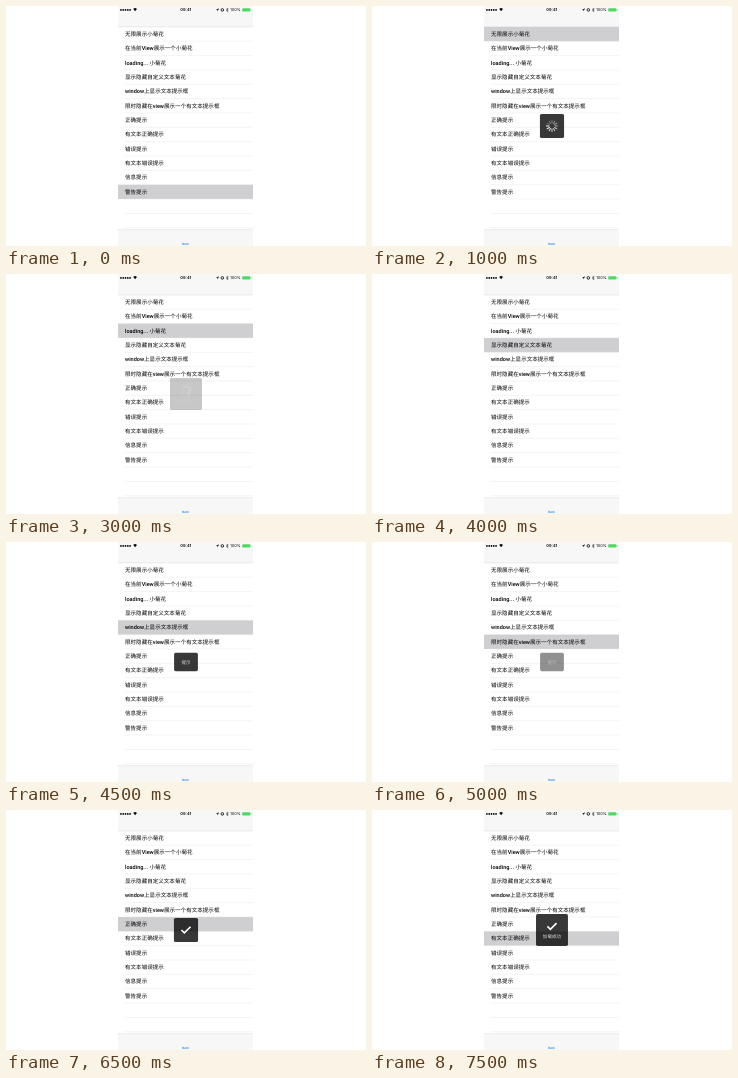
Animation of 360x240 px, one loop 8000 ms. Source, as an HTML page:

```html
<!DOCTYPE html>
<html lang="zh-CN">
<head>
<meta charset="utf-8">
<title>HUD list</title>
<style>
html, body { margin: 0; width: 100%; height: 100%; overflow: hidden; background: #fff; }
svg { display: block; width: 360px; height: 240px; }
text { font-family: Roboto, "Noto Sans CJK SC", "Noto Sans CJK", sans-serif; text-rendering: geometricPrecision; }
#status text { font-family: Inter, sans-serif; }
#list text { font-size: 17px; font-weight: 500; }
</style>
</head>
<body>
<svg viewBox="0 0 360 240">
  <!-- the phone screen, in 414 x 736 points -->
  <g transform="translate(112 0) scale(.32609)">
    <rect width="414" height="736" fill="#fff"/>
    <rect width="414" height="64" fill="#f8f7f8"/>
    <path d="M0 64H414" stroke="#d8d7d8" stroke-width="1.5"/>
    <g id="status" transform="translate(0 1)">
      <g id="dots"></g>
      <path d="M47 8q5.500-5 11 0l-5.500 7z"/>
      <text x="208" y="15" font-size="12.5" font-weight="600" text-anchor="middle">09:41</text>
      <g transform="translate(4 0)">
        <path d="M296 11l10-5-5 10v-5z"/>
        <circle cx="316" cy="11" r="4" fill="none" stroke="#000" stroke-width="2.500"/>
        <path d="M328 8l6 6-3 3V5l3 3-6 6" fill="none" stroke="#000" stroke-width="1.200"/>
        <text x="340" y="15" font-size="12">100%</text>
        <rect x="377" y="6" width="25" height="10" rx="2" fill="#4cd964"/>
        <rect x="403" y="9" width="2.500" height="4" rx="1" fill="#4cd964"/>
      </g>
    </g>
    <rect id="mark" width="414" height="44" fill="#cfced0"/>
    <g id="list"></g>
    <rect y="687" width="414" height="49" fill="#f8f7f8"/>
    <path d="M0 686H414" stroke="#d8d7d8" stroke-width="1.5"/>
    <text x="207" y="733" font-size="10" font-weight="500" text-anchor="middle" fill="#147aef">Item</text>
    <rect id="panel" rx="5" fill="#000"/>
    <g id="spinner"></g>
    <path id="check" d="M-14 0L-5 9L14-10" fill="none" stroke="#fff" stroke-width="5"/>
    <text id="label" font-size="14" text-anchor="middle" fill="#ddd"></text>
  </g>
</svg>
<script>
const $ = id => document.getElementById(id);
const STEP = 500, ROW = 44, TOP = 64, CX = 208.5, CY = 368;

function set(el, attrs) {
  for (const key in attrs) el.setAttribute(key, attrs[key]);
}

function add(parent, tag, attrs, text = '') {
  const el = document.createElementNS('http://www.w3.org/2000/svg', tag);
  set(el, attrs);
  el.textContent = text;
  return parent.appendChild(el);
}

const titles = [
  '无限展示小菊花', '在当前View展示一个小菊花', 'loading... 小菊花',
  '显示隐藏自定义文本菊花', 'window上显示文本提示框',
  '限时隐藏在view展示一个有文本提示框', '正确提示', '有文本正确提示',
  '错误提示', '有文本错误提示', '信息提示', '警告提示'
];

for (let i = 0; i < 5; i++) add($('dots'), 'circle', { cx: 9 + i * 7, cy: 11, r: 2.7 });
for (let i = 0; i < 14; i++) {
  const y = TOP + i * ROW;
  add($('list'), 'path', { d: `M20 ${y + ROW}H414`, stroke: '#e3e2e4', 'stroke-width': 1.2 });
  if (titles[i]) add($('list'), 'text', { x: 21.5, y: y + 28 }, titles[i]);
}
for (let i = 0; i < 12; i++) {
  add($('spinner'), 'path', {
    d: 'M0-9V-17', stroke: '#fff', 'stroke-width': 3, 'stroke-linecap': 'round',
    opacity: .25 + .75 * i / 11, transform: `rotate(${i * 30})`
  });
}

const huds = {
  spin: { w: 74, h: 74, icon: 'spinner' },
  loading: { w: 98, h: 98, icon: 'spinner', text: 'loading...' },
  custom: { w: 98, h: 98, icon: 'spinner', text: '加载中...' },
  tip: { w: 73, h: 56, text: '提示' },
  done: { w: 74, h: 74, icon: 'check' },
  success: { w: 98, h: 98, icon: 'check', text: '加载成功' }
};

// selected row, HUD, HUD opacity; one entry per half second
const steps = [
  [11, 'spin', 0], [0, 'spin', .6], [0, 'spin', 1],
  [1, 'spin', 1], [1, 'spin', .05],
  [2, 'loading', 1], [2, 'loading', .28],
  [3, 'custom', 1], [3, 'custom', 0],
  [4, 'tip', 1], [5, 'tip', .56], [5, 'tip', 1],
  [6, 'done', .62], [6, 'done', 1],
  [7, 'success', .6], [7, 'success', 1]
];

// panel and content fade separately, so content stays dim over a faint panel
function show(n) {
  const [row, name, opacity] = steps[n];
  const { w, h, icon, text = '' } = huds[name];
  const place = `translate(${CX} ${CY - (text ? 11 : 0)})`;
  set($('mark'), { y: TOP + row * ROW });
  set($('panel'), { x: CX - w / 2, y: CY - h / 2, width: w, height: h, opacity: opacity * .78 });
  set($('spinner'), {
    transform: `${place} rotate(${n * 150})`,
    opacity: icon === 'spinner' ? opacity : 0
  });
  set($('check'), { transform: place, opacity: icon === 'check' ? opacity : 0 });
  set($('label'), { x: CX, y: icon ? CY + 26 : CY + 5, opacity });
  $('label').textContent = text;
}

const start = performance.now();
let shown = -1;
function tick() {
  const n = Math.floor((performance.now() - start) / STEP) % steps.length;
  if (n !== shown) show(shown = n);
  requestAnimationFrame(tick);
}
tick();
</script>
</body>
</html>
```
